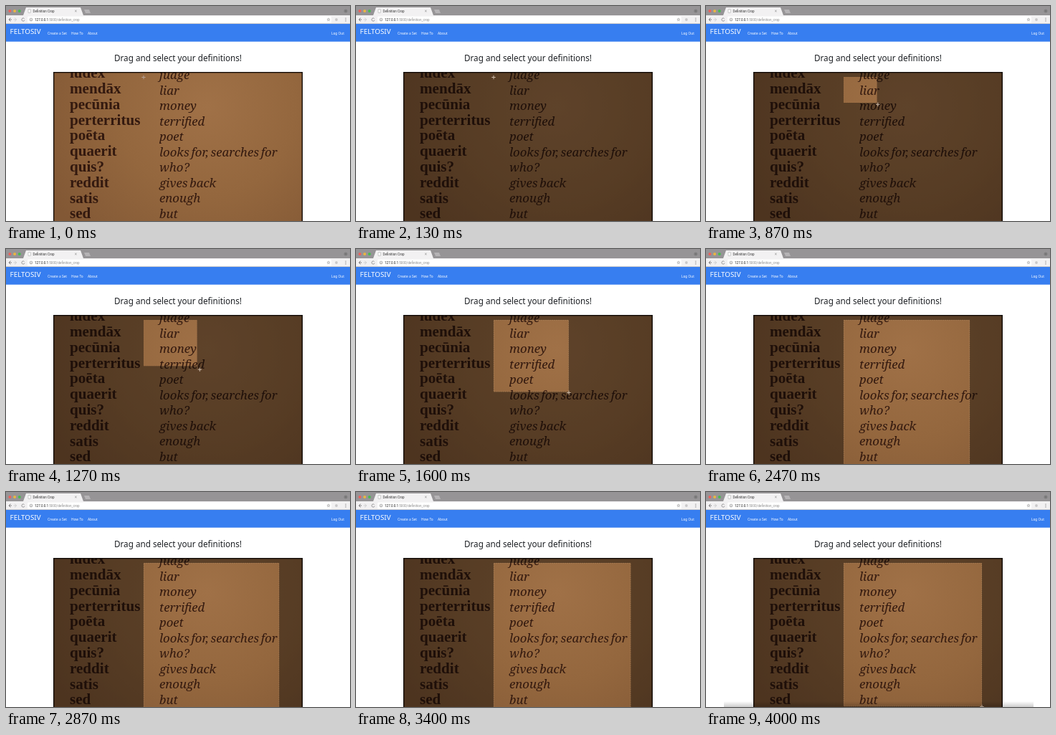
An HTML page with a canvas for the animation above (4.07 s loop, 480x300 px).

```html
<!DOCTYPE html>
<html lang="en">
<head>
<meta charset="utf-8">
<title>Definition Crop</title>
<style>
  html, body { margin: 0; width: 100%; height: 100%; overflow: hidden; background: #fff; }
  canvas { display: block; width: 480px; height: 300px; }
</style>
</head>
<body>
<canvas id="stage"></canvas>
<script>
const W = 480, H = 300, LOOP = 4070, STEP = 200 / 3;
const canvas = document.getElementById('stage');
const ctx = canvas.getContext('2d');
const ratio = window.devicePixelRatio || 1;
canvas.width = W * ratio;
canvas.height = H * ratio;

const UI = '"Noto Sans", sans-serif';
const CHROME = 'Roboto, sans-serif';
const BOLD = 'bold 21.1px "Liberation Serif", serif';
const ITALIC = 'italic 16.8px "Noto Serif", serif';
const INK = '#33190f';
const START = { x: 192, y: 99 };
const LAG = 30;

const latin = ['iūdex', 'mendāx', 'pecūnia', 'perterritus', 'poēta', 'quaerit', 'quis?', 'reddit', 'satis', 'sed'];
const english = ['judge', 'liar', 'money', 'terrified', 'poet', 'looks for, searches for', 'who?', 'gives back', 'enough', 'but'];

// Pointer path: time, x, y
const path = [
  [465, 192, 99], [600, 207, 110], [800, 237, 133], [870, 240, 137], [1000, 240, 137],
  [1200, 262, 158], [1470, 296, 197], [1600, 297, 200], [1800, 309, 220], [2067, 336, 264],
  [2134, 349, 283], [2270, 362, 302], [2600, 374, 312], [2800, 381, 310],
  [3130, 382, 308], [3670, 385, 300], [4000, 385, 299]
];

function pointer(t) {
  if (t <= path[0][0]) return { ...START };
  for (let i = 1; i < path.length; i++) {
    const [t0, x0, y0] = path[i - 1], [t1, x1, y1] = path[i];
    if (t <= t1) {
      const k = (t - t0) / (t1 - t0);
      return { x: x0 + (x1 - x0) * k, y: y0 + (y1 - y0) * k };
    }
  }
  const last = path[path.length - 1];
  return { x: last[1], y: last[2] };
}

function rect(x, y, w, h, color) {
  ctx.fillStyle = color;
  ctx.fillRect(x, y, w, h);
}

function dot(x, y, r, color) {
  ctx.fillStyle = color;
  ctx.beginPath();
  ctx.arc(x, y, r, 0, Math.PI * 2);
  ctx.fill();
}

function poly(points, color) {
  ctx.fillStyle = color;
  ctx.beginPath();
  points.forEach(([x, y]) => ctx.lineTo(x, y));
  ctx.fill();
}

function line(points, color, width) {
  ctx.strokeStyle = color;
  ctx.lineWidth = width;
  ctx.beginPath();
  points.forEach(([x, y]) => ctx.lineTo(x, y));
  ctx.stroke();
}

function ring(x, y, r, color, from = 0, to = Math.PI * 2) {
  ctx.strokeStyle = color;
  ctx.lineWidth = 0.6;
  ctx.beginPath();
  ctx.arc(x, y, r, from, to);
  ctx.stroke();
}

function text(str, x, y, font, color, align = 'left') {
  ctx.font = font;
  ctx.fillStyle = color;
  ctx.textAlign = align;
  ctx.fillText(str, x, y);
  return ctx.measureText(str).width;
}

function drawBrowser() {
  rect(0, 0, W, 13, '#969496');
  ['#f0605a', '#eab640', '#48bd50'].forEach((c, i) => dot(5.4 + i * 6.7, 7, 2, c));
  poly([[24, 13], [28, 2], [104, 2], [108, 13]], '#f2f1f2');
  poly([[109, 5], [116, 5], [118, 10], [111, 10]], '#b5b3b5');
  rect(31, 4.8, 3.2, 4.4, '#fff');
  ctx.strokeStyle = '#888';
  ctx.lineWidth = 0.4;
  ctx.strokeRect(31, 4.8, 3.2, 4.4);
  text('Definition Crop', 37.4, 8.8, '4.6px ' + CHROME, '#333');
  line([[96.2, 5.8], [98.6, 8.2]], '#777', 0.6);
  line([[98.6, 5.8], [96.2, 8.2]], '#777', 0.6);
  ring(474, 7, 2, '#666');
  dot(474, 7, 0.9, '#666');

  rect(0, 13, W, 12, '#f2f1f2');
  line([[6.4, 16.6], [4, 19], [6.4, 21.4]], '#666', 0.8);
  line([[4, 19], [8, 19]], '#666', 0.8);
  line([[12.2, 16.6], [14.6, 19], [12.2, 21.4]], '#c4c4c4', 0.8);
  line([[10.6, 19], [14.6, 19]], '#c4c4c4', 0.8);
  ring(24, 19, 2.1, '#666', 0.3, 5.6);
  ctx.fillStyle = '#fff';
  ctx.beginPath();
  ctx.roundRect(30, 14.5, 424, 9, 1.5);
  ctx.fill();
  ring(35, 19, 1.9, '#777');
  line([[35, 18.6], [35, 20.2]], '#777', 0.6);
  const w = text('127.0.0.1', 40, 20.7, '4.6px ' + CHROME, '#222');
  text(':5000/definition_crop', 40 + w, 20.7, '4.6px ' + CHROME, '#8a8a8a');
  const star = [];
  for (let i = 0; i <= 10; i++) {
    const r = i % 2 ? 0.9 : 2.2, a = i * Math.PI / 5 - Math.PI / 2;
    star.push([450 + r * Math.cos(a), 19 + r * Math.sin(a)]);
  }
  line(star, '#888', 0.5);
  dot(461, 19, 1.9, '#c9c8c9');
  [17, 19, 21].forEach(y => dot(474, y, 0.6, '#666'));
  rect(0, 24.3, W, 0.7, '#bcbcbe');
}

function drawPage() {
  rect(0, 25, W, 24.7, '#377ef0');
  text('FELTOSIV', 5.6, 39.4, '300 9.8px ' + UI, '#fff');
  const link = '4.8px ' + UI;
  text('Create a Set', 58, 39.5, link, '#fff');
  text('How To', 91, 39.5, link, '#fff');
  text('About', 114, 39.5, link, '#fff');
  text('Log Out', 472, 39.5, link, '#fff', 'right');
  text('Drag and select your definitions!', 240, 76.6, '11.7px ' + UI, '#1d2024', 'center');
}

function drawPhoto() {
  const g = ctx.createRadialGradient(280, 140, 0, 280, 140, 250);
  g.addColorStop(0, '#a07147');
  g.addColorStop(0.5, '#94673e');
  g.addColorStop(1, '#825835');
  ctx.save();
  ctx.beginPath();
  ctx.rect(66, 92, 348, 208);
  ctx.clip();
  rect(66, 92, 348, 208, g);
  latin.forEach((word, i) => text(word, 89, 100.2 + i * 21.8, BOLD, INK));
  ctx.wordSpacing = '-1.6px';
  english.forEach((word, i) => text(word, 214, 102 + i * 21.5, ITALIC, INK));
  ctx.restore();
}

function drawCrop(t) {
  const tip = pointer(t), corner = pointer(t - LAG);
  const w = corner.x - START.x, h = corner.y - START.y;
  const shade = Math.min(1, t / (2 * STEP)) * 0.41;

  ctx.fillStyle = `rgba(0,0,0,${shade})`;
  ctx.beginPath();
  ctx.rect(66, 92, 348, 208);
  if (w > 0) ctx.rect(START.x, START.y, w, h);
  ctx.fill('evenodd');

  if (w > 0) {
    const calm = Math.hypot(tip.x - corner.x, tip.y - corner.y) < 1.8;
    ctx.strokeStyle = `rgba(225,200,170,${calm ? 0.3 : 0.08})`;
    ctx.lineWidth = 0.7;
    ctx.setLineDash([1.5, 1.5]);
    ctx.strokeRect(START.x + 0.3, START.y + 0.3, w - 0.6, h - 0.6);
    ctx.setLineDash([]);
  }

  ctx.strokeStyle = '#0c0705';
  ctx.lineWidth = 1.3;
  ctx.strokeRect(66.7, 92.7, 346.6, 240);

  const { x, y } = tip;
  const tone = t < STEP ? '#b5a094' : '#cdbaa8';
  line([[x - 2.7, y + 0.5], [x + 2.7, y + 0.5]], tone, 1);
  line([[x, y - 2.2], [x, y + 3.2]], tone, 1);
}

// Soft shadow rising at the lower edge near the end
function drawEdge(t) {
  const k = Math.max(0, Math.min(1, (t - 3730) / 270));
  if (!k) return;
  const g = ctx.createLinearGradient(0, 292, 0, 300);
  g.addColorStop(0, 'rgba(0,0,0,0)');
  g.addColorStop(1, `rgba(0,0,0,${0.2 * k})`);
  rect(25, 292, 432, 8, g);
}

function draw(now) {
  const t = Math.floor((now % LOOP + 3.4) / STEP) * STEP;
  ctx.setTransform(ratio, 0, 0, ratio, 0, 0);
  rect(0, 0, W, H, '#fff');
  drawBrowser();
  drawPage();
  drawPhoto();
  drawCrop(t);
  drawEdge(t);
}

let begin = null;
function tick(now) {
  if (begin === null) begin = now;
  draw(now - begin);
  requestAnimationFrame(tick);
}
draw(0);
requestAnimationFrame(tick);
</script>
</body>
</html>
```
